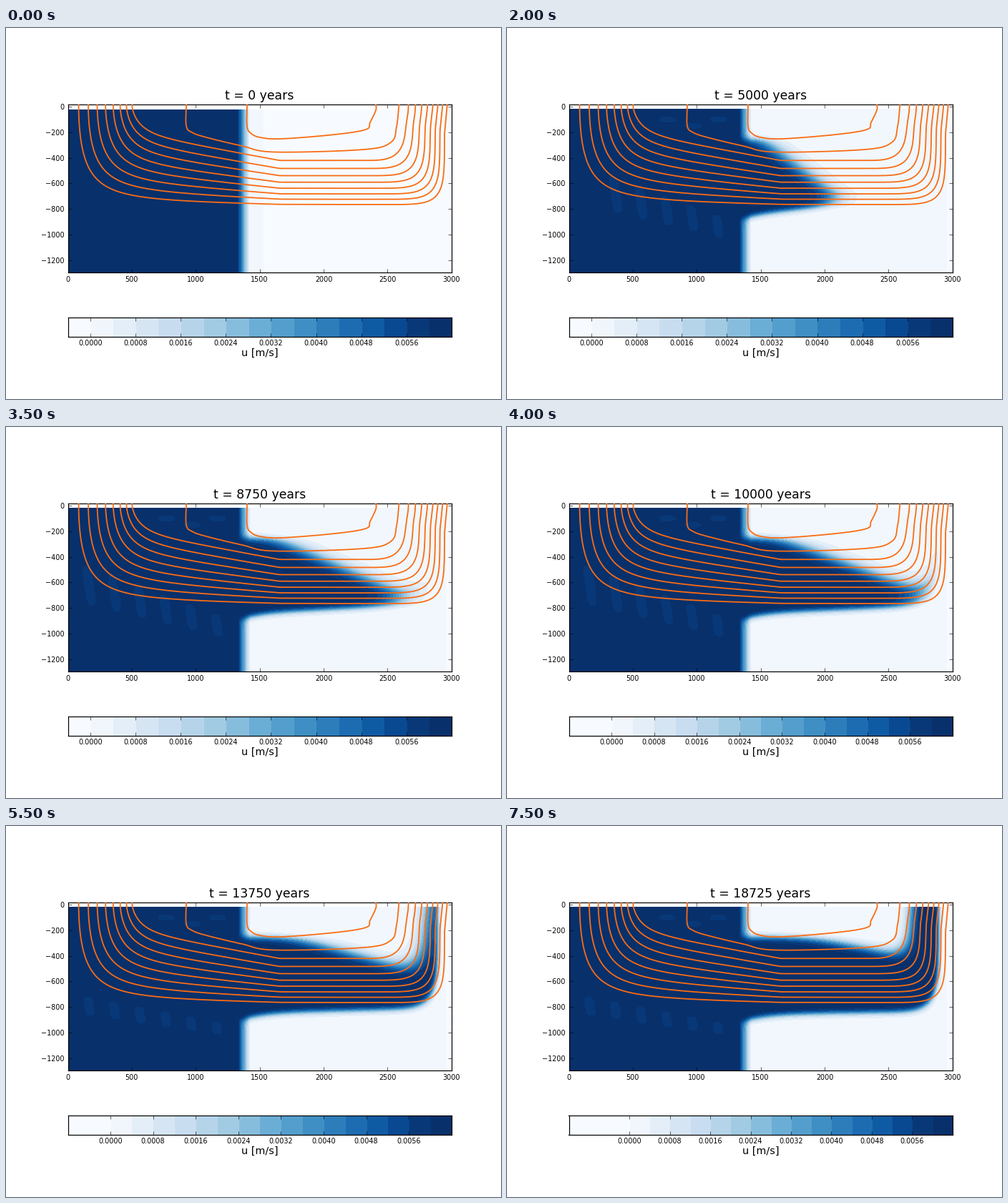
Animation, 692 px wide and 519 px high, one loop 8 s. Source, as a matplotlib script:

```python
import numpy as np
import matplotlib.pyplot as plt
from matplotlib.animation import FuncAnimation
from matplotlib.colors import ListedColormap

W, H, DPI = 692, 519, 86.5
LEFT, WIDTH = 86.5, 536.3
SCALE = WIDTH / 3000           # pixels per metre
ZERO_Y = 110.1                 # pixel row of depth 0
STEP = 0.0004
U_MAX = 0.0063
WALL = 1370                    # edge of the initial block, in metres
TURN, ASPECT = 2295, 0.875     # where the flow turns upward, and how tightly

plt.rcParams.update({
    "font.family": "DejaVu Sans", "axes.linewidth": 1.0,
    "xtick.direction": "in", "ytick.direction": "in",
    "xtick.top": True, "ytick.right": True,
    "xtick.labelsize": 8, "ytick.labelsize": 8,
    "xtick.major.size": 4, "ytick.major.size": 4,
    "xtick.major.width": 0.5, "ytick.major.width": 0.5,
    "xtick.major.pad": 3.5, "ytick.major.pad": 4,
})


def place(top, height):
    return [LEFT / W, 1 - (top + height) / H, WIDTH / W, height / H]


def streamline(i):
    """Left flank sinks exponentially, right flank is a superellipse."""
    bottom = 766 - 41 * i - 0.17 * i**3
    start = 84 + 78 * i - 2.6 * i**2
    q = (766 - bottom) / 340
    ramp = 0.05 + 0.45 * q

    u = (TURN - start) * np.linspace(0, 1, 150)**2
    sink = 1 - np.exp(-(u / 72)**(0.58 + 0.17 * q))
    left_depth = bottom * ((1 - ramp) * sink
                           + ramp * np.minimum(u / (1656 - start), 1))

    theta = np.linspace(np.pi / 2, 0, 150)
    power = 220 / bottom
    side = np.clip(np.cos(theta), 0, 1)**power
    right_depth = bottom * np.sin(theta)**power
    pinch = 20 * (1 - np.exp(-(right_depth / 110)**2))
    right = TURN + side * (ASPECT * bottom - pinch)

    x = np.r_[start, start + u, right, right[-1]]
    depth = np.r_[-20, left_depth, right_depth, -20]
    return x, -depth


def smooth(points, n=12):
    """Catmull-Rom curve through pixel points, in metres."""
    p = np.asarray(points, float)
    p = np.vstack([2 * p[0] - p[1], p, 2 * p[-1] - p[-2]])
    s = np.linspace(0, 1, n)[:, None]
    px, py = np.vstack([
        0.5 * (2 * b + (c - a) * s + (2 * a - 5 * b + 4 * c - d) * s**2
               + (3 * b - a - 3 * c + d) * s**3)
        for a, b, c, d in zip(p, p[1:], p[2:], p[3:])]).T
    return (px - LEFT) / SCALE, (ZERO_Y - py) / SCALE


SHALLOW = [(252, 106.5), (252, 137), (260, 146), (280, 153), (330, 165),
           (375, 173.5), (500, 170), (538, 160), (546, 138), (549.5, 106.5)]
TOP = [(337, 106.5), (337, 137), (342, 147), (355, 153), (385, 155),
       (460, 149), (503, 142), (509, 132), (517, 115), (517, 106.5)]

xs = np.linspace(0, 3000, 537)
ys = np.linspace(-1300, -20, 230)
X, Y = np.meshgrid(xs, ys)
DEPTH = -Y
BEYOND = np.maximum(X - TURN, 0)
# depth at which the streamline through each point runs level
LEVEL = ((BEYOND / ASPECT)**5 + DEPTH**5)**0.2
TRAVEL = X - WALL + 0.3 * (LEVEL - DEPTH)


def logistic(v):
    return 1 / (1 + np.exp(-np.clip(v, -40, 40)))


def plume(t):
    """Front that advances faster along deeper streamlines."""
    if t == 0:
        return np.zeros_like(X)
    speed = 2.6e-4 * np.clip(LEVEL - 145, 0, 535)
    front = logistic((speed * t - TRAVEL) / (62 * np.sqrt(t / 5000)))
    roof = logistic((LEVEL - 255) / 16)
    progress = np.clip(TRAVEL / (0.139 * t), 0, 1)
    floor = (800 + 50 * t / 18725 - 50 * progress**2
             + 60 * np.exp(-np.maximum(X - WALL, 0) / 200))
    reach = ((BEYOND / 595)**6 + (DEPTH / floor)**6)**(1 / 6)
    return front * roof * logistic((1 - reach) * floor / 14)


def blot(x, depth, rx, ry):
    lean = (X - x - 0.15 * (DEPTH - depth)) / rx
    return np.exp(-lean**4 - ((DEPTH - depth) / ry)**4)


def ripples(t):
    """Faint lighter patches in the saturated part."""
    if t < 2500:
        return 0
    late = np.interp(t, [10000, 13750], [0, 1])
    top = sum(blot(770 + 200 * j, 100 + 50 * (j % 2), 80, 28) for j in range(3))
    teeth = sum(blot(165 + 200 * k, 625 + 62 * k + late * (170 - 28 * k),
                     48, 190 - 17 * k - late * (100 - 11 * k))
                for k in range(t < 7500, 6))
    return np.clip(top + teeth, 0, 1)


def velocity(t):
    block = np.clip((1424 - X) / 100, 0, 1)
    c = 1 - (1 - block) * (1 - plume(t))
    still = X > (2950 if t else 1530)
    base = np.where(still, -0.0001, 0.0001) * (1 - c)
    return U_MAX * c + base - 0.0005 * ripples(t) * c


fig = plt.figure(figsize=(W / DPI, H / DPI), dpi=DPI, facecolor="white")
ax = fig.add_axes(place(ZERO_Y - 20 * SCALE, 1320 * SCALE))
ax.set(xticks=range(0, 3001, 500), yticks=range(-1200, 1, 200))
bar = fig.add_axes(place(405.2, WIDTH / 20))
middle = (LEFT + WIDTH / 2) / W
title = fig.text(middle, 1 - 100 / H, "", size=14.4, ha="center")
fig.text(middle, 1 - 455.3 / H, "u [m/s]", size=12, ha="center", va="center")

for line in [streamline(i) for i in range(8)] + [smooth(SHALLOW), smooth(TOP)]:
    ax.plot(*line, color="#fa6c14", lw=1.5, zorder=3)

fill = None


def draw(frame):
    global fill
    t = min(1250 * frame, 18725)
    title.set_text(f"t = {t} years")
    below = 1 + (t >= 10000) + (t >= 15000)
    levels = np.arange(-below, 17) * STEP
    mids = (levels[:-1] + levels[1:]) / 2
    colors = plt.cm.Blues(np.clip(mids / 0.006, 0, 1))

    if fill is not None:
        fill.remove()
    fill = ax.contourf(xs, ys, velocity(t), levels=levels, colors=colors, zorder=1)
    ax.set(xlim=(0, 3000), ylim=(-1300, 20))

    bar.clear()
    bar.imshow(np.arange(len(mids))[None], cmap=ListedColormap(colors), aspect="auto",
               interpolation="nearest", extent=(levels[0], levels[-1], 0, 1))
    ticks = np.arange(8) * 2 * STEP
    bar.set_xticks(ticks, [f"{v:.4f}" for v in ticks])
    bar.set_yticks([])
    return []


anim = FuncAnimation(fig, draw, frames=16, interval=500, init_func=lambda: [],
                     repeat=True, repeat_delay=0, blit=False)
plt.show()
```
